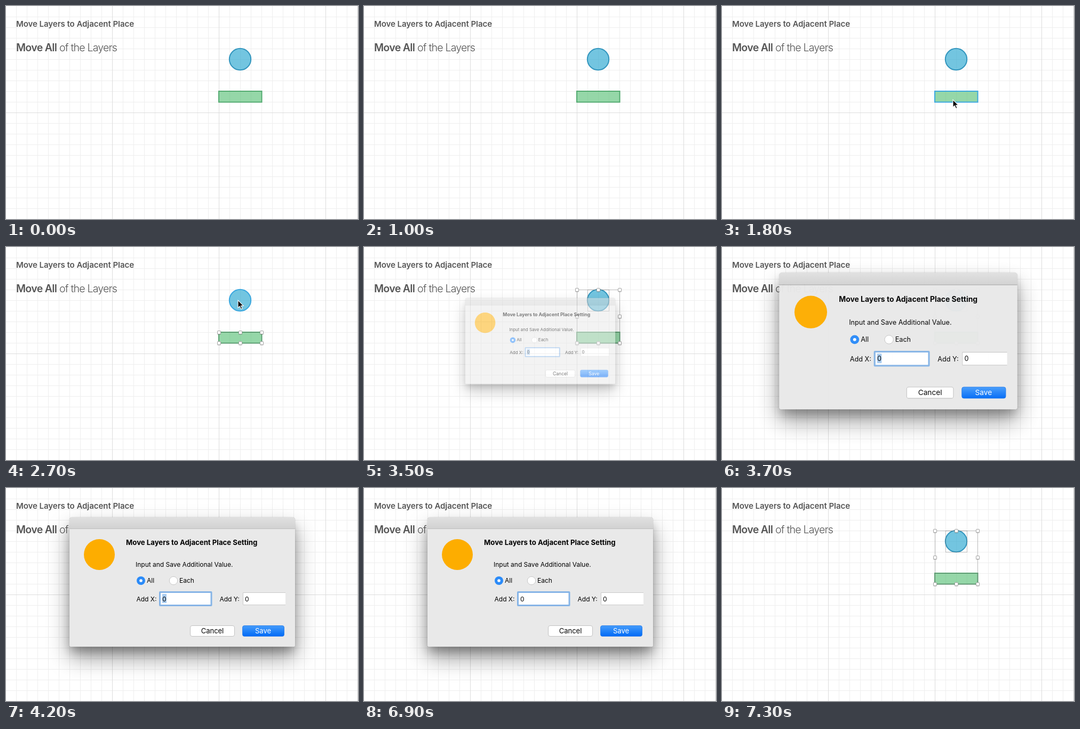
An HTML page that plays this animation: 660 px wide and 400 px high, repeating every 8 s.

```html
<!DOCTYPE html>
<html lang="en">
<head>
<meta charset="utf-8">
<title>Move Layers to Adjacent Place</title>
<style>
  html, body { margin: 0; width: 100%; height: 100%; overflow: hidden; background: #fff; }
  #stage { position: relative; width: 660px; height: 400px; overflow: hidden; contain: strict; }
  svg { position: absolute; left: 0; top: 0; width: 100%; height: 100%; }
  text { font-family: Inter, Roboto, sans-serif; }
  .head { fill: #555; font-weight: 600; }
  .light { font-weight: 300; }
  #dialog {
    position: absolute; left: 119px; top: 55px; width: 423px; height: 243px; border-radius: 5px 5px 3px 3px;
    background: linear-gradient(#e0e0e0, #d2d2d2 21px, #bebebe 21px, #bebebe 22px, #e9e9e9 22px);
    box-shadow: 0 0 1px rgba(0,0,0,.55), 0 12px 18px -2px rgba(0,0,0,.25), 0 21px 42px rgba(0,0,0,.4);
  }
  #dialog text { fill: #000; font-size: 12px; }
  #dialog .title { font-size: 13.2px; font-weight: 700; }
  #dialog .btn { font-size: 13px; text-anchor: middle; }
</style>
</head>
<body>
<div id="stage">
  <svg viewBox="0 0 660 400">
    <g id="grid" shape-rendering="crispEdges"></g>
    <text class="head" x="19" y="39" font-size="15" letter-spacing="-.05">Move Layers to Adjacent Place</text>
    <text class="head" x="19" y="85" font-size="19.5" letter-spacing="-.65">Move All</text>
    <text class="head light" x="100" y="85" font-size="19.5" letter-spacing="-.77">of the Layers</text>
    <circle id="disc" cx="439" cy="100" r="20.2" fill="#2ba8d0" fill-opacity=".66" stroke="#3396be" stroke-width="2"/>
    <rect id="bar" x="399" y="160" width="80.5" height="20.5" fill="#5fc37c" fill-opacity=".66" stroke="#53aa70" stroke-width="2"/>
    <g id="pickBar"></g>
    <g id="pickBoth"></g>
    <path id="cursor" d="M0 0V14.2L3.3 11.2L5.6 16.4L8 15.4L5.7 10.4H10.2Z" fill="#000" stroke="#fff" stroke-width="1.1"/>
  </svg>

  <div id="dialog">
    <svg viewBox="119 55 423 243">
      <defs>
        <linearGradient id="blue" x2="0" y2="1"><stop stop-color="#459cfb"/><stop offset="1" stop-color="#006af6"/></linearGradient>
      </defs>
      <circle cx="175" cy="125" r="29" fill="#fdad00"/>
      <text class="title" x="225" y="107">Move Layers to Adjacent Place Setting</text>
      <text x="243" y="148">Input and Save Additional Value.</text>
      <circle cx="253" cy="174" r="8" fill="#2b8bf8"/>
      <circle cx="253" cy="174" r="2.8" fill="#fff"/>
      <text x="264" y="178">All</text>
      <circle cx="314" cy="174" r="7.7" fill="#fff" stroke="#bcbcbc" stroke-width=".8"/>
      <text x="325" y="178">Each</text>
      <text x="244.5" y="213">Add X:</text>
      <rect x="287" y="194" width="99.5" height="28" rx="2" fill="#86b4e6"/>
      <rect x="290" y="197" width="93.5" height="22" fill="#fff"/>
      <rect id="mark" x="293" y="199" width="8" height="17" fill="#a9cbee"/>
      <text x="293" y="212.5">0</text>
      <text x="400.5" y="213">Add Y:</text>
      <rect x="444" y="196" width="80" height="24" fill="#fff"/>
      <path d="M524 196.5H444.5V219.5H524" fill="none" stroke="#c9c9c9"/>
      <text x="448" y="212.5">0</text>
      <rect x="345.5" y="258.5" width="83" height="20" rx="3.5" fill="#fff" stroke="#c2c2c2"/>
      <text class="btn" x="387" y="273">Cancel</text>
      <rect x="443.5" y="258.5" width="78" height="20" rx="3.5" fill="url(#blue)" stroke="#1f78ea" stroke-width=".8"/>
      <text class="btn" x="482" y="273" style="fill:#fff">Save</text>
    </svg>
  </div>
</div>

<script>
const $ = id => document.getElementById(id);
const LOOP = 8000, STEP = 100;

// [time, x, y] of the pointer tip
const path = [
  [1400, 426, 302], [1500, 427, 272], [1600, 429, 232], [1700, 431, 197],
  [1800, 433, 176], [1900, 434, 175], [2400, 434, 160],
  [2500, 435, 135], [2600, 435, 110], [2700, 435, 100]
];
// [time, scale, opacity] of the dialog
const spring = [
  [3400, .3, .12], [3500, .665, .5], [3600, 1.092, .84], [3700, 1.055, .97],
  [3800, .99, 1], [3900, .98, 1], [4000, .995, 1], [4100, 1.004, 1], [4200, 1, 1]
];

const line = (x, y, w, h, fill) => `<rect x="${x}" y="${y}" width="${w}" height="${h}" fill="${fill}"/>`;
const shade = n => n % 200 ? '#eeeeee' : '#dcdcdc';

function drawGrid() {
  let out = '';
  for (let y = 20; y < 400; y += 20) if (y !== 200) out += line(0, y, 660, 1, shade(y));
  for (let x = 20; x < 660; x += 20) out += line(x - 1, 0, 1, 400, shade(x));
  out += line(0, 200, 660, 1, shade(200)) + line(659, 0, 1, 400, '#cccccc');
  $('grid').innerHTML = out;
}

const frame = (x, y, w, h) =>
  `<rect x="${x + .5}" y="${y + .5}" width="${w}" height="${h}" fill="none" stroke="#777" stroke-opacity=".45"/>`;
const knob = (x, y) =>
  `<rect x="${x - 3}" y="${y - 2.6}" width="7" height="7" rx="1" fill="#000" fill-opacity=".25"/>` +
  `<rect x="${x - 2.5}" y="${y - 2.5}" width="6" height="6" rx="1" fill="#fff" stroke="#999" stroke-width=".9"/>`;

function selection(y, h, sides) {
  let out = frame(399, y, 80, h);
  for (const x of [399, 439, 479]) out += knob(x, y) + knob(x, y + h);
  if (sides) out += knob(399, y + h / 2) + knob(479, y + h / 2);
  return out;
}

const last = (table, t) => table.filter(row => row[0] <= t).pop();
const show = (id, on) => { $(id).style.display = on ? '' : 'none'; };

function draw(now) {
  const t = Math.floor(now % LOOP / STEP) * STEP;

  const tip = t < 3400 && last(path, t);
  show('cursor', tip);
  if (tip) $('cursor').setAttribute('transform', `translate(${tip[1]} ${tip[2]})`);

  $('bar').setAttribute('stroke', t >= 1800 && t < 2200 ? '#3ba8df' : '#53aa70');
  $('disc').setAttribute('stroke', t >= 2600 && t < 3000 ? '#3ba8df' : '#3396be');
  show('pickBar', t >= 2200 && t < 3000);
  show('pickBoth', t >= 3000);

  const pose = t < 7000 && last(spring, t);
  show('dialog', pose);
  if (pose) {
    $('dialog').style.transform = `scale(${pose[1]})`;
    $('dialog').style.opacity = pose[2];
  }
  show('mark', t < 6900);
}

drawGrid();
$('pickBar').innerHTML = selection(160, 20, false);
$('pickBoth').innerHTML = frame(419, 80, 40, 40) + frame(399, 160, 80, 20) + selection(80, 100, true);

const start = performance.now();
function tick() {
  draw(performance.now() - start);
  requestAnimationFrame(tick);
}
draw(0);
requestAnimationFrame(tick);
</script>
</body>
</html>
```
